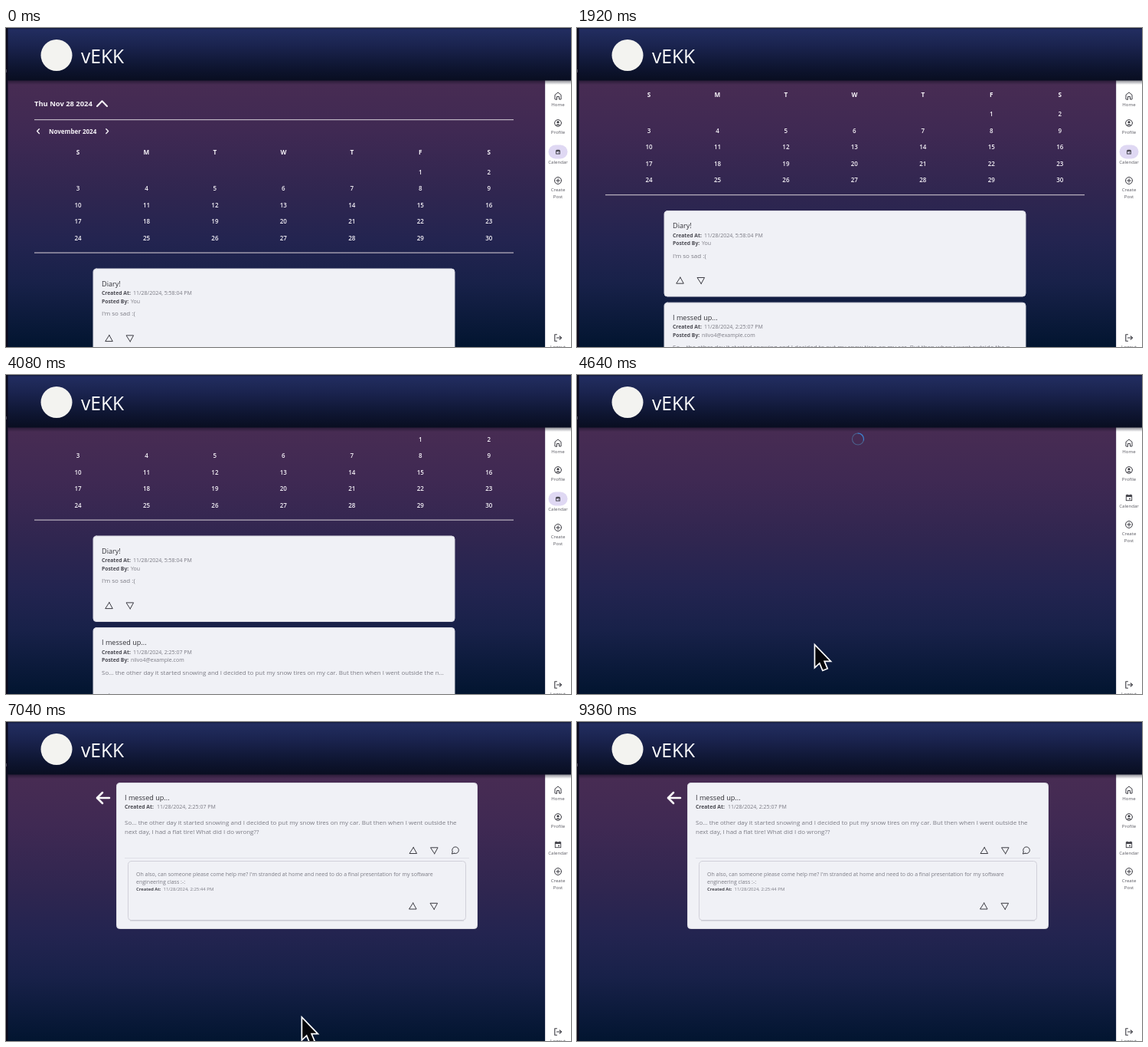
Write an HTML page with a canvas that moves like this. It is 738 px wide and 416 px high and loops after 9.44 s.

```html
<!DOCTYPE html>
<html lang="en">
<head>
<meta charset="utf-8">
<title>Diary calendar</title>
<style>
html, body { margin: 0; width: 100%; height: 100%; overflow: hidden; background: #0b0a1c; }
canvas { display: block; width: 100vw; height: 100vh; }
</style>
</head>
<body>
<canvas id="stage" width="738" height="416"></canvas>
<script>
const W = 738, H = 416, LOOP = 9440;
const ctx = document.getElementById("stage").getContext("2d");
const FONT = '"Open Sans", "Noto Sans", sans-serif';
const INK = "#3b3b42", SOFT = "#7b7b84", CARD = "#f0f1f6";

const clamp01 = v => Math.min(1, Math.max(0, v));
const progress = (t, from, to) => clamp01((t - from) / (to - from));
const easeInOut = u => u < 0.5 ? 2 * u * u : 1 - 2 * (1 - u) * (1 - u);
const mix = (a, b, u) => a + (b - a) * u;

function gradient(y0, y1, stops) {
  const g = ctx.createLinearGradient(0, y0, 0, y1);
  stops.forEach(([at, color]) => g.addColorStop(at, color));
  return g;
}

function rect(x, y, w, h, fill) {
  ctx.fillStyle = fill;
  ctx.fillRect(x, y, w, h);
}

// y is the middle of the capitals
function text(str, x, y, size, color, weight = 400, align = "left") {
  ctx.font = `${weight} ${size}px ${FONT}`;
  ctx.textAlign = align;
  ctx.fillStyle = color;
  ctx.fillText(str, x, y + size * 0.36);
}

function line(points, color, width = 1, close = false) {
  ctx.beginPath();
  points.forEach(([x, y]) => ctx.lineTo(x, y));
  if (close) ctx.closePath();
  ctx.strokeStyle = color;
  ctx.lineWidth = width;
  ctx.stroke();
}

function ring(x, y, r, color, width = 1, from = 0, to = Math.PI * 2) {
  ctx.beginPath();
  ctx.arc(x, y, r, from, to);
  ctx.strokeStyle = color;
  ctx.lineWidth = width;
  ctx.stroke();
}

function disc(x, y, r, color) {
  ctx.beginPath();
  ctx.arc(x, y, r, 0, Math.PI * 2);
  ctx.fillStyle = color;
  ctx.fill();
}

function panel(x, y, w, h, r, fill, border) {
  ctx.beginPath();
  ctx.roundRect(x, y, w, h, r);
  ctx.fillStyle = fill;
  ctx.fill();
  if (border) {
    ctx.strokeStyle = border;
    ctx.lineWidth = 1;
    ctx.stroke();
  }
}

function votes(x, y, gap = 27.5) {
  line([[x, y - 4.3], [x + 4.6, y + 4], [x - 4.6, y + 4]], INK, 1, true);
  line([[x + gap, y + 4.6], [x + gap + 4.6, y - 3.7], [x + gap - 4.6, y - 3.7]], INK, 1, true);
}

function labelled(label, value, x, y, size, gap) {
  text(label, x, y, size * 0.97, "#4b4b53", 700);
  text(value, x + gap, y, size, SOFT);
}

function backdrop() {
  rect(0, 0, W, H, "#0b0a1c");
  rect(2.5, 68, 701.5, 348, gradient(68, H, [
    [0, "#482c53"], [0.2, "#3f2953"], [0.42, "#302650"],
    [0.6, "#232450"], [0.76, "#182149"], [1, "#021530"]
  ]));
}

function header() {
  rect(2.5, 68, W - 2.5, 6, gradient(68, 74, [[0, "rgba(8,8,24,.5)"], [1, "rgba(8,8,24,0)"]]));
  rect(2.5, 0, W - 2.5, 68.5, gradient(0, 68, [
    [0, "#111734"], [0.03, "#222d60"], [0.35, "#1a234e"], [0.75, "#0e1531"], [1, "#090e21"]
  ]));
  rect(0, 54, 1, 4, "#4a4a5c");
  disc(66, 35.5, 20.5, "#f3f3f0");
  text("vEKK", 98, 36.8, 24.6, "#ffffff");
}

function calendarIcon(x, y, s) {
  ctx.lineJoin = "miter";
  ctx.strokeStyle = INK;
  ctx.lineWidth = 0.9;
  ctx.strokeRect(x - s, y - s + 0.6, s * 2, s * 2 - 0.6);
  rect(x - s, y - s + 0.4, s * 2, s * 0.6, INK);
  rect(x - s + 1, y - s - 0.8, 0.9, 1.6, INK);
  rect(x + s - 1.9, y - s - 0.8, 0.9, 1.6, INK);
  rect(x + 0.2, y + 0.6, s * 0.45, s * 0.45, INK);
  ctx.lineJoin = "round";
}

function sidebar(onCalendar) {
  const x = 721;
  const label = (str, y) => text(str, x, y, 6.1, "#57575f", 400, "center");
  rect(704, 68, 34, H - 68, "#ffffff");
  rect(704, 68, 1, H - 68, "#dddbe3");

  line([[717, 93], [717, 87.2], [721, 84], [725, 87.2], [725, 93], [722.5, 93],
    [722.5, 89.5], [719.5, 89.5], [719.5, 93]], INK, 1, true);
  label("Home", 100);

  ring(x, 124, 4.4, INK);
  disc(x, 122.8, 1.6, INK);
  ctx.beginPath();
  ctx.ellipse(x, 127, 2.8, 1.5, 0, Math.PI, 0);
  ctx.fillStyle = INK;
  ctx.fill();
  label("Profile", 136);

  const shift = onCalendar ? 4 : 0;
  if (onCalendar) {
    panel(708.5, 152.5, 25, 18, 9, "#dfd8f3");
    calendarIcon(x, 161.7, 2.4);
  } else {
    calendarIcon(x, 160, 3.7);
  }
  label("Calendar", 171 + shift);

  const y = 195 + shift;
  ring(x, y, 4.5, INK);
  line([[x - 2.4, y], [x + 2.4, y]], INK);
  line([[x, y - 2.4], [x, y + 2.4]], INK);
  label("Create", y + 12.3);
  label("Post", y + 20.5);

  line([[719.5, 399.8], [716.8, 399.8], [716.8, 408.2], [719.5, 408.2]], INK, 1.1);
  line([[719.5, 404], [725.3, 404]], INK, 1.1);
  line([[723.2, 401.8], [725.4, 404], [723.2, 406.2]], INK, 1.1);
  label("Logout", 415.5);
}

function entry(y, title, date, author, body) {
  panel(114, y, 472, 111.5, 4, CARD, "#dadae2");
  text(title, 125, y + 19.6, 9.1, "#333339");
  labelled("Created At:", date, 125, y + 31.7, 7, 41);
  labelled("Posted By:", author, 125, y + 42.2, 7, 38);
  text(body, 125, y + 58.4, 8, SOFT);
  votes(134.7, y + 90.6, 27.3);
}

function calendarPage(scroll) {
  const white = "#f6f3f8", rule = "#bdb5c2";
  ctx.save();
  ctx.translate(0, -scroll);

  text("Thu Nov 28 2024", 37, 98.5, 9.4, white, 700);
  line([[119, 102], [125.5, 95.3], [132, 102]], white, 2.1);
  rect(37, 119, 626, 1.2, rule);
  line([[43.4, 131.8], [40.6, 134.6], [43.4, 137.4]], white, 1.4);
  line([[130.8, 131.8], [133.6, 134.6], [130.8, 137.4]], white, 1.4);
  text("November 2024", 56, 134.7, 8, white, 700);

  const column = i => 94 + i * 89.45;
  [..."SMTWTFS"].forEach((d, i) => text(d, column(i), 162.3, 8.2, white, 700, "center"));
  for (let day = 1; day <= 30; day++) {
    const cell = day + 4;
    text(day, column(cell % 7), 187.7 + Math.floor(cell / 7) * 21.55, 8, white, 600, "center");
  }
  rect(37, 292.5, 626, 1.2, rule);

  entry(314, "Diary!", "11/28/2024, 5:58:04 PM", "You", "I'm so sad :(");
  entry(433.6, "I messed up...", "11/28/2024, 2:25:07 PM", "nilvo4@example.com",
    "So... the other day it started snowing and I decided to put my snow tires on my car. But then when I went outside the n...");
  ctx.restore();
}

function postPage() {
  line([[135, 99], [119, 99]], "#ffffff", 2.5);
  line([[126, 92], [119, 99], [126, 106]], "#ffffff", 2.5);

  panel(144.5, 79.5, 471, 190, 4, CARD, "#dadae2");
  text("I messed up...", 155, 98.3, 9.1, "#333339", 500);
  labelled("Created At:", "11/28/2024, 2:25:07 PM", 155, 110.6, 7, 42);
  text("So... the other day it started snowing and I decided to put my snow tires on my car. But then when I went outside the",
    155, 131, 8, SOFT);
  text("next day, I had a flat tire! What did I do wrong??", 155, 143.5, 8, SOFT);
  votes(532, 167.5);

  ring(587, 167.2, 4.3, INK, 1, Math.PI * 0.85, Math.PI * 2.62);
  line([[583.2, 169.3], [582.3, 172], [585.4, 171.3]], INK);
  rect(155, 177, 450, 1, "#dfdfe7");

  panel(159.5, 181.5, 441, 77, 4, CARD, "#d0d0d9");
  rect(162, 258.5, 436, 1, "#c6c6d0");
  text("Oh also, can someone please come help me? I'm stranded at home and need to do a final presentation for my software",
    170, 198, 7, SOFT);
  text("engineering class :-:", 170, 208.8, 7, SOFT);
  labelled("Created At:", "11/28/2024, 2:25:44 PM", 170, 218.2, 6, 35.5);
  votes(531.5, 240);
}

function spinner(t) {
  const a = (t - 4640) / 1000 * Math.PI * 2;
  ring(367, 83.5, 7.5, "#4c618c", 1.1);
  ring(367, 83.5, 7.5, "#3c7fd0", 1.2, a - Math.PI / 2, a + 0.2);
}

function cursor(x, y, alpha) {
  ctx.save();
  ctx.globalAlpha = alpha;
  ctx.translate(x, y);
  ctx.beginPath();
  [[0, 0], [0, 26], [5.8, 20.6], [10, 30.6], [14.8, 28.6], [10.6, 18.8], [18.2, 18.8]]
    .forEach(([px, py]) => ctx.lineTo(px, py));
  ctx.closePath();
  ctx.lineJoin = "miter";
  ctx.strokeStyle = "#ffffff";
  ctx.lineWidth = 3.4;
  ctx.stroke();
  ctx.fillStyle = "#05050a";
  ctx.fill();
  ctx.restore();
}

function draw(t) {
  const onCalendar = t < 4400;
  ctx.lineCap = ctx.lineJoin = "round";
  backdrop();
  if (onCalendar) calendarPage(104 * easeInOut(progress(t, 1600, 2110)));
  else if (t < 5240) spinner(t);
  else postPage();
  sidebar(onCalendar);
  header();

  if (t >= 4240 && t < 8000) {
    const u = easeInOut(progress(t, 5400, 6360));
    cursor(mix(311.3, 387.2, u), mix(353.8, 387, u), 1 - progress(t, 7760, 8000));
  }
}

function tick() {
  draw(performance.now() % LOOP);
  requestAnimationFrame(tick);
}
tick();
</script>
</body>
</html>
```
